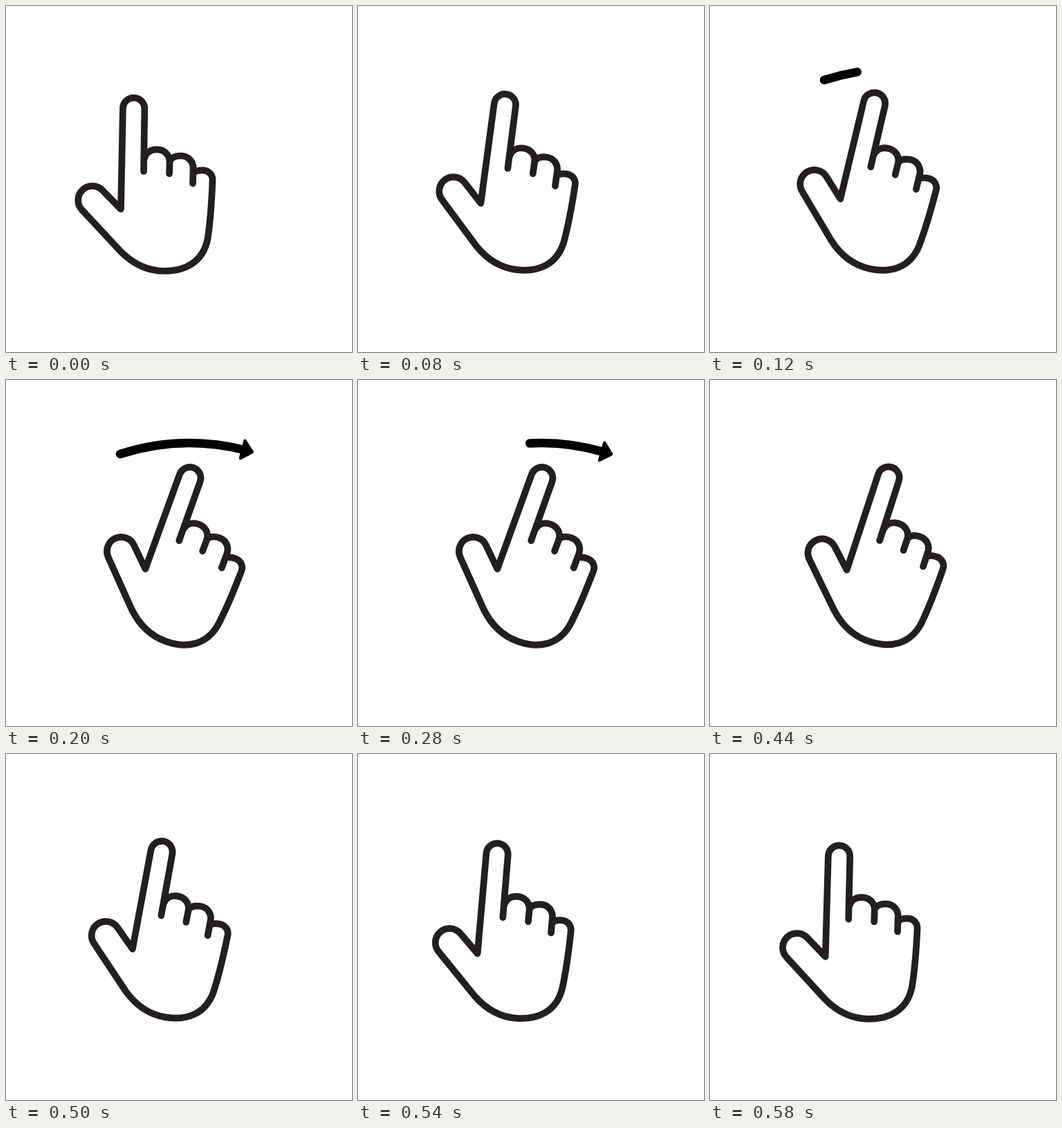
Write an HTML page that moves like this. It is 500x500 px and loops after 0.6 s.

```html
<!DOCTYPE html>
<html lang="en">
<head>
<meta charset="utf-8">
<title>Swipe right</title>
<style>
html, body { margin: 0; width: 100%; height: 100%; overflow: hidden; background: #fff; }
svg { display: block; width: 100%; height: 100%; }
path { stroke-linecap: round; stroke-linejoin: round; }
</style>
</head>
<body>
<svg viewBox="0 0 500 500">
  <g id="hand" fill="none" stroke="#231f20" stroke-width="9.7">
    <path d="M199 239L200.3 148.5A15.7 15.7 0 0 0 168.9 148L166 293.5L139.4 266.3
      A19.9 19.9 0 0 0 110 294.9L166 355C184 373 205 383 229 383
      C259 383 285 370 291.5 336C295.5 310 297 290 298.5 251
      C298.5 244 293 237.5 284.5 237.3C279 237.2 275 238 271 240.5"/>
    <path d="M200 220C202 212 209 207.4 218 207.4C228.5 207.4 236.5 215 236.5 225L236 242.5"/>
    <path d="M237 223C240 218.5 246 216.5 253 216.5C263.5 216.5 270.5 225 270.5 234L270 256.5"/>
  </g>
  <g id="arrow" stroke="#000">
    <path id="shaft" fill="none" stroke-width="12.6"/>
    <path id="head" d="M-3 -13L-3 13L11 0Z" stroke-width="4.4"/>
  </g>
</svg>
<script>
const LOOP = 600, STEP = 20, SWING = 18.8;
const LEFT = 165, RIGHT = 355.5;
const [hand, arrow, shaft, head] =
  ['hand', 'arrow', 'shaft', 'head'].map(id => document.getElementById(id));

const span = (t, a, b) => Math.min(1, Math.max(0, (t - a) / (b - a)));
const easeInOut = p => (1 - Math.cos(Math.PI * p)) / 2;
const easeOut = p => Math.sin(Math.PI / 2 * p);

// The arrow follows a shallow parabola.
const curveY = x => 91 + 0.0016 * (x - 265) ** 2;
const slope = x => 0.0032 * (x - 265);
const along = p => LEFT + (RIGHT - LEFT) * p;

function drawHand(t) {
  const turn = easeInOut(span(t, 0, 200)) - easeInOut(span(t, 400, 600));
  hand.setAttribute('transform', `rotate(${SWING * turn} 245.5 390)`);
}

function drawArrow(t) {
  const front = easeOut(span(t, 99.5, 227));
  const back = easeInOut(span(t, 212, 360));
  const visible = front > 0.02 && back < 1;
  arrow.style.display = visible ? '' : 'none';
  if (!visible) return;
  const a = along(back), b = along(front), half = (b - a) / 2;
  shaft.setAttribute('d',
    `M${a} ${curveY(a)}Q${a + half} ${curveY(a) + slope(a) * half} ${b} ${curveY(b)}`);
  head.style.display = front > 0.3 ? '' : 'none';
  const angle = Math.atan(slope(b)) * 180 / Math.PI;
  head.setAttribute('transform', `translate(${b} ${curveY(b)}) rotate(${angle})`);
}

let start;
function frame(now) {
  start ??= now;
  const t = Math.floor((now - start) % LOOP / STEP) * STEP;
  drawHand(t);
  drawArrow(t);
  requestAnimationFrame(frame);
}
drawHand(0);
drawArrow(0);
requestAnimationFrame(frame);
</script>
</body>
</html>
```
